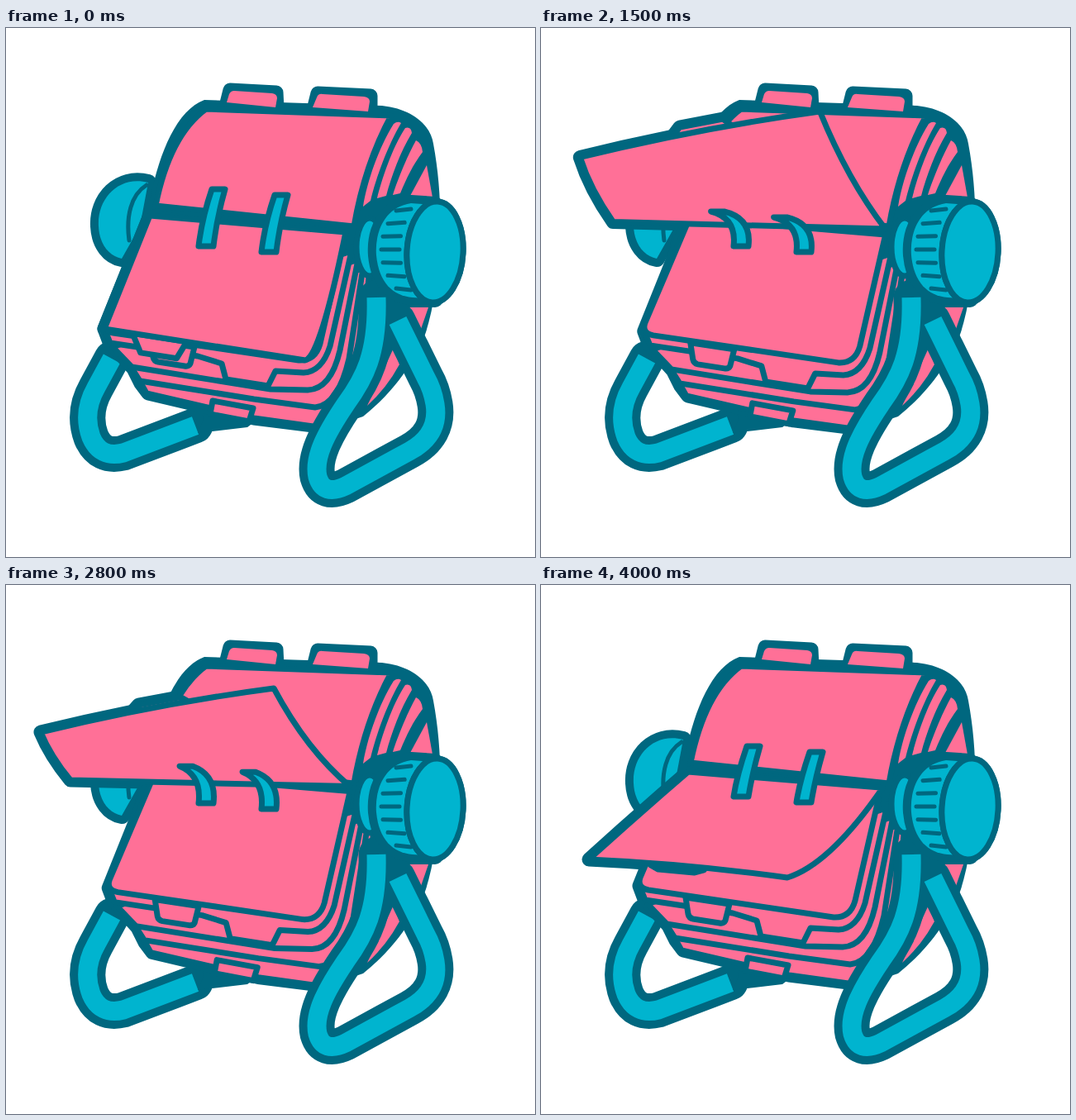
Write an HTML page that moves like this. It is 640 px wide and 640 px high and loops after 4.1 s.

```html
<!DOCTYPE html>
<html lang="en">
<head>
<meta charset="utf-8">
<title>Rotary card file</title>
<style>
  html, body { margin: 0; width: 100%; height: 100%; overflow: hidden; background: #fff; }
  svg { display: block; width: 100vw; height: 100vh; }
  path, ellipse { stroke-linejoin: round; }
  .pink { fill: #ff7097; }
  .teal { fill: #00b4cf; }
  .ink { fill: #00677f; }
  .line { stroke: #00677f; stroke-width: 7; }
  .halo { fill: #00677f; stroke: #00677f; stroke-width: 17; }
  .knob { stroke: #00677f; stroke-width: 20; paint-order: stroke; }
  .rib { fill: none; stroke: #00677f; stroke-width: 5; stroke-linecap: round; }
  .outer, .inner { fill: none; stroke: #00677f; stroke-width: 43; stroke-linecap: round; }
  .inner { stroke: #00b4cf; stroke-width: 23; stroke-linecap: butt; }
</style>
</head>
<body>
<svg viewBox="0 0 640 640">
  <defs>
    <path id="legL" d="M128 400 L109 435 Q92 465 103 495 Q114 521 142 514 L229 481"/>
    <path id="legR" d="M448 326 C450 395 433 425 411 455 C386 492 372 520 377 543 Q384 567 411 554 L488 512 Q525 492 519 455 Q516 437 508 423 L474 354"/>
    <path id="front" d="M174 227 L411 247 L380 382 Q374 403 354 402 L130 369 Q116 366 120 354 Z"/>
  </defs>

  <use href="#legL" class="outer"/>
  <use href="#legL" class="inner"/>

  <path class="knob teal" d="M172 187 C136 178 110 207 112 240 C113 262 125 276 140 279 L162 240 Z"/>
  <path class="rib" d="M170 190 C151 202 145 228 149 257"/>

  <path class="halo tab"/>
  <path class="halo card"/>

  <path class="ink" d="M166 224 L175 204 C186 150 207 99 240 87 L455 94 C492 98 514 118 517 140 C532 220 526 310 508 368 C497 400 470 440 432 470 L378 488 L300 477 L292 483 L232 490 L240 470 L172 440 L128 370 Z"/>
  <g id="backTab">
    <path class="halo" d="M266 95 L271 75 L327 78 L328 98 Z"/>
    <path class="pink" d="M267 90 L270 80 Q272 76 276 76 L322 79 Q328 80 328 85 L326 96 Z"/>
  </g>
  <path class="halo" d="M372 99 L377 79 L441 82 L441 99 Z"/>
  <path class="pink" d="M371 96 L376 84 Q378 79 383 80 L433 83 Q440 84 440 89 L438 101 Z"/>

  <g class="pink">
    <path d="M432 216 C437 185 451 145 469 116 Q474 112 478 115 C462 142 448 180 441 209 Z"/>
    <path d="M449 206 C454 185 467 145 483 121 Q490 119 491 127 C477 150 466 180 460 203 Z"/>
    <path d="M468 202 C475 180 487 152 496 136 Q503 139 504 150 C492 166 485 181 477 200 Z"/>
    <path d="M489 203 L509 166 L516 205 Z"/>
    <path d="M469 387 L476 407 Q461 435 437 457 Z"/>
    <path d="M482 338 L511 338 L501 367 Z"/>
  </g>
  <path class="pink line" d="M181 215 L421 240 Q434 165 466 106 L242 98 Q198 130 181 215 Z"/>

  <g id="stack" class="pink line">
    <path class="halo" d="M174 227 L119 364 L125 380 L154 412 L163 430 L172 442 L300 472 L380 482 L420 270 Z"/>
    <path d="M440 290 L430 400 Q412 470 379 483 L300 472 L170 442 L160 424 Z"/>
    <path d="M250 451 L299 460 L294 476 L247 467 Z"/>
    <path d="M432 290 L415 400 Q402 456 374 459 L300 449 L162 427 L150 408 Z"/>
    <path d="M426 280 L404 390 Q393 437 365 438 L320 437 L152 410 L129 386 Z"/>
    <path d="M418 270 L392 385 Q382 416 360 417 L326 415 L317 433 L266 425 L261 406 L232 397 L126 381 L120 366 Z"/>
    <path d="M175 378 L228 386 L223 406 Q221 410 216 409 L184 404 Q179 403 178 398 Z"/>
    <use href="#front"/>
  </g>

  <path class="pink line tab"/>
  <path class="pink line card"/>
  <path class="teal line ring"/>
  <path class="teal line ring" transform="translate(76 7)"/>

  <use href="#legR" class="outer"/>
  <use href="#legR" class="inner"/>

  <ellipse class="teal line" cx="440" cy="265" rx="16" ry="35"/>
  <path class="knob teal" d="M519 214 L490 212 C457 217 446 248 448 275 C451 308 468 324 492 326 L519 328 Z"/>
  <ellipse class="teal line" cx="519" cy="271" rx="34" ry="61" transform="rotate(3 519 271)"/>
  <ellipse class="rib" cx="519" cy="271" rx="35" ry="62" transform="rotate(3 519 271)"/>
  <g id="ribs"></g>
</svg>

<script>
const LOOP = 4100, STEP = 100;
// Moments at which one card comes to rest and the next starts to turn.
const rests = [0, 667, 1030, 1867, 2400, 3200, 3800, 4600];
// Quarter turns of a card: hinge corner, left tip, right tip.
const turn = [
  [174, 227, 119, 364, 362, 402],
  [178, 226, 58, 332, 298, 354],
  [78, 236, 42, 178, 324, 125],
  [162, 224, 91, 121, 391, 87],
  [181, 215, 238, 99, 466, 106]
];

const { sin, cos, PI, max, min, floor } = Math;
const $ = id => document.getElementById(id);
const setPath = (name, d) =>
  document.querySelectorAll('.' + name).forEach(e => e.setAttribute('d', d));

// Smooth curve through the quarter turns.
function spline(u) {
  const i = min(floor(u * 4), 3), t = u * 4 - i;
  const row = n => turn[max(0, min(n, 4))];
  return row(i).map((p, j) => {
    const q = row(i + 1)[j];
    const m = (q - row(i - 1)[j]) / 2, n = (row(i + 2)[j] - p) / 2;
    return p + t * (m + t * (3 * (q - p) - 2 * m - n + t * (2 * (p - q) + m + n)));
  });
}

function cardPath([hx, hy, lx, ly, rx, ry], u) {
  const kx = 411 + 10 * u, ky = 247 - 7 * u;
  const bend = (x0, y0, x1, y1, dx, dy) =>
    `Q${(x0 + x1) / 2 + dx} ${(y0 + y1) / 2 + dy} ${x1} ${y1}`;
  return `M${hx} ${hy}L${kx} ${ky}`
    + bend(kx, ky, rx, ry, -6, 72 * (1 - u) ** 2.2)
    + bend(rx, ry, lx, ly, 0, -8 * sin(PI * u))
    + bend(lx, ly, hx, hy, -24 * u * u, 0) + 'Z';
}

function tabPath([, , lx, ly, rx, ry], u) {
  const from = .14 + .24 * sin(PI * u), rise = 22 * cos(PI * u ** .6);
  const at = (k, dy) => `${lx + (rx - lx) * k} ${ly + (ry - ly) * k + dy}`;
  return `M${at(from, 0)}L${at(from + .04, rise)} ${at(from + .22, rise)} ${at(from + .27, 0)}Z`;
}

function ringPath(push, u) {
  const tx = 257 - 45 * push, ty = 195 + 28 * push;
  const by = 264 - 8 * sin(PI * min(1, u * 2));
  const side = (x, d) => x + d;
  return `M${side(tx, -8)} ${ty}Q${side(246, -9)} 230 ${side(242, -9)} ${by}`
    + `L${side(242, 9)} ${by}Q${side(246, 9)} 230 ${side(tx, 8)} ${ty}Z`;
}

function draw(t) {
  let n = 0;
  while (t >= rests[n + 1]) n++;
  const u = (t - rests[n]) / (rests[n + 1] - rests[n]);
  const edge = spline(u);
  const push = max(0, sin(PI * (u - .25) / .75));

  setPath('card', cardPath(edge, u));
  setPath('tab', tabPath(edge, u));
  setPath('ring', ringPath(push, u));
  $('stack').setAttribute('transform', `translate(${6 * push} ${3 * push})`);
  $('backTab').style.display = u > .6 ? 'none' : '';
}

// Grip marks follow the round side of the knob.
for (let i = 0; i < 7; i++) {
  const a = (i - 3) / 3, x = 454 + 18 * a * a, y = 268 + 47 * a;
  $('ribs').innerHTML += `<path class="rib" d="M${x} ${y}l${22 - 4 * a * a} ${2 * a}"/>`;
}

const start = performance.now();
function tick() {
  const t = (performance.now() - start) % LOOP;
  draw(floor(t / STEP) * STEP);
  requestAnimationFrame(tick);
}
draw(0);
requestAnimationFrame(tick);
</script>
</body>
</html>
```
